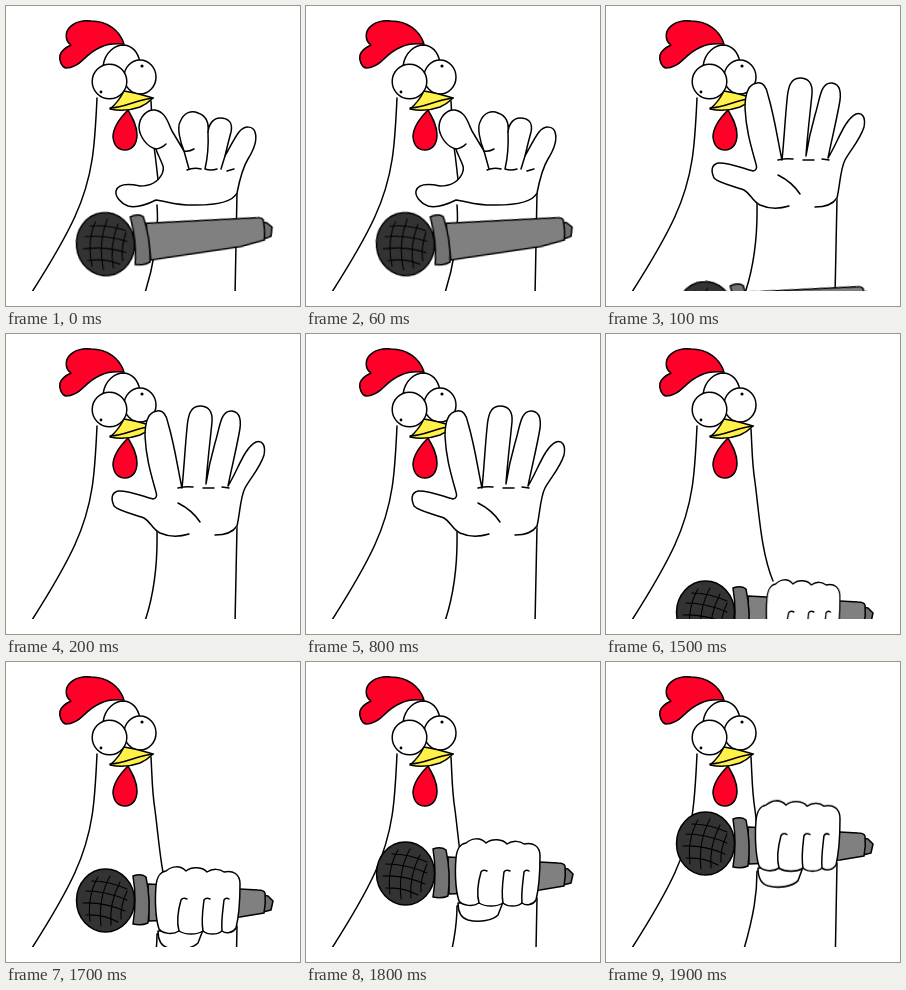
An HTML page for the animation above (2 s loop, 294 by 300 pixels).

```html
<!DOCTYPE html>
<html lang="en">
<head>
<meta charset="utf-8">
<title>Mic drop</title>
<style>
  html, body { margin: 0; width: 100%; height: 100%; overflow: hidden; background: #fff; }
  svg { display: block; width: 294px; height: 285px; overflow: hidden; }
  path, ellipse, circle { stroke: #000; stroke-width: 1.5; stroke-linejoin: round; stroke-linecap: round; }
  .white { fill: #fff; }
  .red { fill: #ff0028; }
  .yellow { fill: #fff04a; }
  .line { fill: none; }
  .mesh { fill: none; stroke-width: 1.1; }
  .dot { stroke: none; }
  .bare { fill: #fff; stroke: none; }

  .relaxed, .open, .grip, .drop, .held, .fist { animation: 2s step-end infinite; }
  .relaxed { animation-name: relaxed; }
  .open { animation-name: open; }
  .grip { animation-name: grip; }
  .drop { animation-name: drop; }
  .held { animation-name: held; }
  .fist { animation-name: fist; transform-origin: 234px 210px; }

  @keyframes relaxed { 0% { visibility: visible; } 5%, 100% { visibility: hidden; } }
  @keyframes open { 0% { visibility: hidden; } 5% { visibility: visible; } 60%, 100% { visibility: hidden; } }
  @keyframes grip { 0% { visibility: hidden; } 60%, 100% { visibility: visible; } }
  @keyframes drop {
    0% { visibility: visible; transform: none; }
    5% { visibility: visible; transform: translateY(69px); }
    10%, 100% { visibility: hidden; transform: translateY(140px); }
  }
  @keyframes held {
    0%, 60% { transform: translateY(97px); }
    85% { transform: translateY(57px); }
    90% { transform: translateY(30px); }
    95%, 100% { transform: none; }
  }
  @keyframes fist {
    0%, 60% { transform: translateY(69px) scaleX(.87); }
    85% { transform: translateY(28px); }
    90% { transform: none; }
    95%, 100% { transform: translateY(-36.5px) scaleY(1.05); }
  }
</style>
</head>
<body>
<svg viewBox="0 0 294 285">
  <defs>
    <g id="mic">
      <path fill="#707070" d="M257 176L262 177L267 182L265 191L257 193Z"/>
      <path fill="#808080" d="M142 165L252 171Q258 171 259 174Q260 184 258 194L234 198L143 202Z"/>
      <ellipse fill="#333" cx="99.5" cy="181.5" rx="29" ry="31.5"/>
      <path class="mesh" d="M86 162Q103 162 121 170M80 172Q100 172 121 181M77 184Q98 183 119 192M80 196Q97 195 112 203
        M92 158Q81 177 84 202M104 157Q92 179 95 207M114 163Q103 184 105 206M121 172Q114 188 115 200"/>
      <path fill="#737373" d="M127 157Q135 154 140 158Q145 181 142 204Q135 207 127 205Q131 181 127 157Z"/>
    </g>
  </defs>

  <g class="body">
    <path class="bare" d="M91 92C87 150 87 200 26 286H170L142 90Z"/>
    <path class="line" d="M91 92C90 114 89 136 86 154C80 193 66 223 26 286M145 95C146 112 146 130 149 148C153 178 155 218 167 247"/>
    <path class="white" d="M97 60C99 46 109 39 118 39C127 40 132 47 134 56"/>
    <path class="red" d="M60 62C55 61 53 53 54 49C56 43 61 41 65 39C59 35 59 27 63 22C68 16 77 14 85 15C102 15 114 25 118 38C108 37 101 38 95 41C88 44 83 48 78 53C73 58 67 62 60 62Z"/>
    <ellipse class="white" cx="134" cy="71" rx="16" ry="17"/>
    <circle class="white" cx="103.5" cy="75.5" r="17.3"/>
    <circle class="dot" cx="95" cy="86" r="1.4"/>
    <circle class="dot" cx="136" cy="60" r="1.6"/>
    <path class="red" d="M122 104C115 111 107 121 107 131C108 140 113 144 119 144C127 144 131 137 131 129C131 119 126 111 122 104Z"/>
    <path class="yellow" d="M104 103C110 98 115 91 118 85Q131 87 147 92Q141 98 134 101C123 105 113 105 104 103Z"/>
    <path class="line" d="M104 102C118 102 130 94 147 92"/>
  </g>

  <g class="relaxed">
    <path class="bare" d="M152 195H231L229 290H138Q152 240 152 195Z"/>
    <path class="line" d="M151 199Q154 240 138 290M231 187L229 290"/>
    <path class="white" d="M231 187C227 195 214 199 190 199C172 200 160 195 150 194C140 199 130 202 122 200C114 197 109 190 110 185
      C112 178 120 177 134 180C144 180 152 176 156 168Q158 163 157 160C154 152 151 147 150 143C141 141 134 131 133 122
      C133 110 142 103 149 104C160 106 162 117 166 125L178 145C174 135 171 122 174 116C178 106 186 104 192 107C201 110 203 117 202 126
      C203 117 208 112 214 112C223 112 227 117 225 126Q222 137 219 150C224 141 229 131 233 126C239 119 247 120 249 126
      C252 135 247 145 242 153C237 161 234 172 231 187Z"/>
    <path class="line" d="M150 143Q156 142 160 138M178 145Q183 146 188 143M178 145L183 163M181 164Q188 161 195 163M202 126Q203 146 199 163
      M199 163Q205 165 211 163M219 150L215 163M221 165L228 163"/>
  </g>

  <g class="open">
    <path class="bare" d="M151 196H231L229 290H138Q151 240 151 196Z"/>
    <path class="line" d="M151 198Q152 250 138 290M231 193L229 290"/>
    <path class="bare" d="M231 194L209 201L179 201L150 196L142 187L109 174L106 162L149 165L139 104L154 77L175 155L199 154L222 153L254 107L239 154Z"/>
    <path class="white" d="M209 201C220 201 227 198 231 192C234 180 234 164 239 154C245 143 254 134 258 121C260 111 256 106 250 108
      C238 114 232 136 222 152C225 137 229 121 233 100C236 86 234 78 226 77C214 76 214 94 209 109C205 123 202 137 200 150
      C201 133 204 108 206 88C207 77 202 72 194 72C184 72 182 82 181 94C179 114 178 135 176 154C172 136 169 113 162 89
      C160 79 156 76 151 77C142 78 139 88 139 102C140 124 145 140 150 158Q152 164 147 165C136 162 121 156 112 157
      C105 159 105 165 108 172C114 178 129 180 138 184C145 188 146 195 154 199C163 203 173 203 183 200" />
    <path class="line" d="M172 154Q180 152 187 153M197 154H208M216 153L223 154M172 169Q186 176 194 188"/>
  </g>

  <g class="drop">
    <use href="#mic" transform="translate(0 56.5) rotate(-6 101 182)"/>
  </g>

  <g class="grip">
    <g class="fist">
      <path class="white" d="M151 244C151 265 148 285 138 318L134 340H229L231 236Z"/>
    </g>
    <g class="held"><use href="#mic"/></g>
    <g class="fist">
      <path class="white" d="M152 241C152 249 155 256 162 258C174 261 187 258 192 253L197 240Z"/>
      <path class="white" d="M153 239C149 227 149 207 150 196C151 186 154 182 160 181C166 176 174 175 180 181C186 176 197 177 201 182
        C207 178 214 179 218 182C227 180 234 184 234 194C234 212 233 226 230 238C227 243 220 244 216 241
        C211 245 202 245 197 241C191 245 179 245 173 241C167 245 157 244 153 239Z"/>
      <path class="line" d="M173 241C170 230 173 217 175 210Q177 207 181 209M197 241C195 230 197 218 198 210Q200 207 204 209M216 241C215 231 217 219 218 210Q220 207 223 209"/>
    </g>
  </g>
</svg>
</body>
</html>
```
